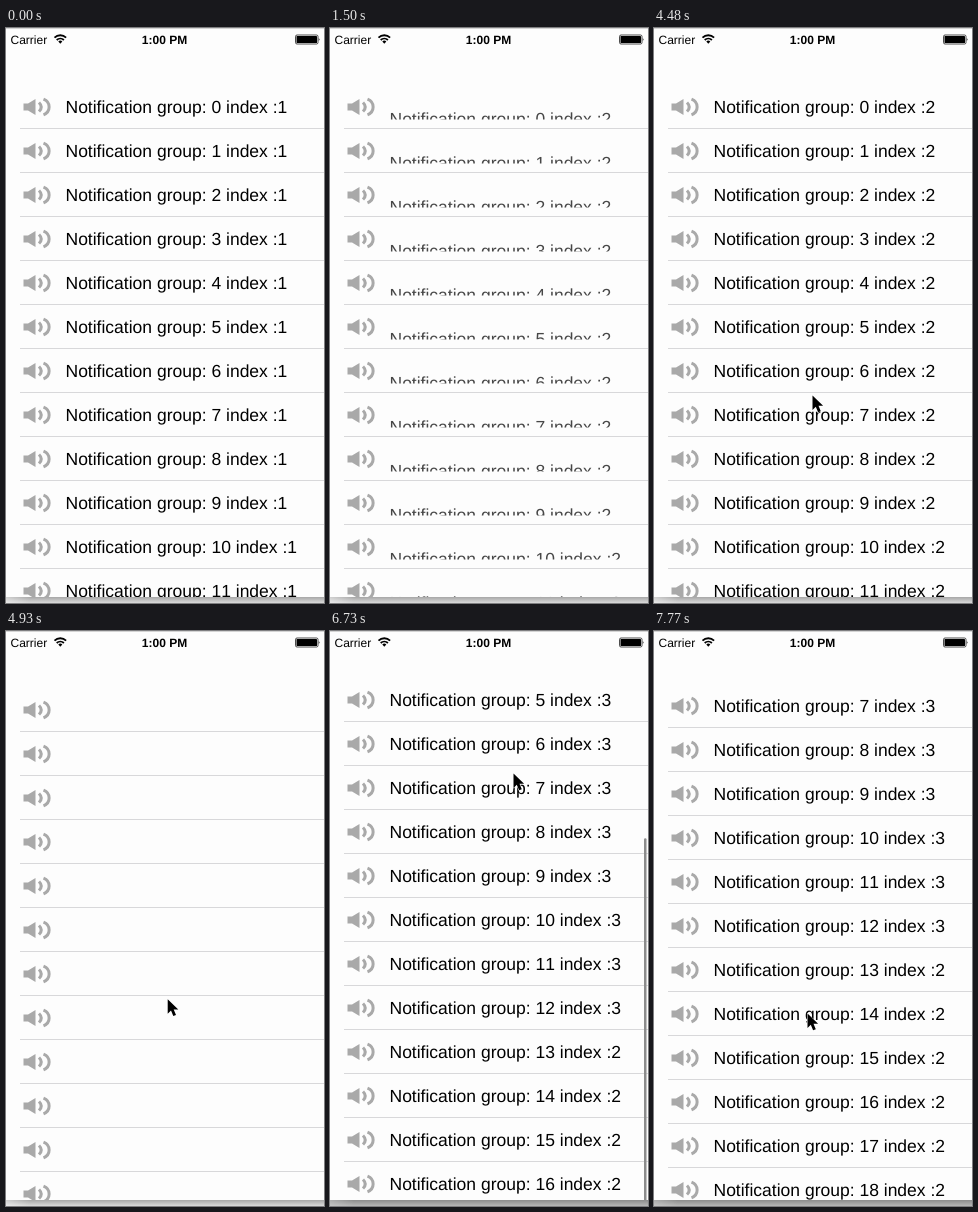
Write an HTML page that moves like this. It is 318x575 px and loops after 8 s.

```html
<!DOCTYPE html>
<html lang="en">
<head>
<meta charset="utf-8">
<title>Notification list</title>
<style>
  html, body { margin: 0; width: 100%; height: 100%; overflow: hidden; background: #fdfdfd; }
  #stage { display: block; width: 318px; height: 575px; }
  text {
    font-family: "Liberation Sans", Arial, sans-serif;
    font-kerning: none;
    text-rendering: geometricPrecision;
  }
  .label { font-size: 17.5px; }
</style>
</head>
<body>
<svg id="stage" viewBox="0 0 318 575">
  <defs>
    <clipPath id="list"><rect y="57" width="318" height="512"/></clipPath>
    <linearGradient id="shadow" x2="0" y2="1">
      <stop offset="0" stop-color="#000" stop-opacity=".34"/>
      <stop offset="1" stop-color="#000" stop-opacity=".14"/>
    </linearGradient>
    <linearGradient id="edge">
      <stop offset="0" stop-color="#fff" stop-opacity=".45"/>
      <stop offset="1" stop-color="#fff" stop-opacity="0"/>
    </linearGradient>
    <g id="speaker" fill="none" stroke="#a9a9a9" stroke-width="3">
      <path d="M17.5 75.5h4.5l7.5-4.5v16l-7.5-4.5h-4.5z" fill="#a9a9a9" stroke="none"/>
      <path d="M33 74.5q4.5 4.5 0 9"/>
      <path d="M37.5 71.2c7.5 3 7.5 12.600 0 15.600"/>
    </g>
  </defs>

  <rect width="318" height="575" fill="#fdfdfd"/>
  <rect width="318" height="1" fill="#d4d4d4"/>

  <text x="4.500" y="15.500" font-size="12">Carrier</text>
  <g fill="none" stroke="#000" stroke-width="1.800">
    <path d="M48.500 9.600a8.300 8.300 0 0 1 11.600 0"/>
    <path d="M50.700 12a5.200 5.200 0 0 1 7.200 0"/>
    <path d="M52.300 13.400a2.900 2.900 0 0 1 4 0l-2 2.300z" fill="#000" stroke="none"/>
  </g>
  <text x="158.500" y="15.500" font-size="12" font-weight="700" text-anchor="middle">1:00 PM</text>
  <rect x="289.500" y="7" width="22.500" height="9" rx="1.500" fill="#fdfdfd" stroke="#000" stroke-width=".7"/>
  <rect x="290.500" y="8" width="20.500" height="7" rx=".6"/>
  <path d="M312.800 10q1.500 1.500 0 3z"/>

  <g clip-path="url(#list)">
    <g id="rows"></g>
    <rect id="bar" x="314" width="2.500" height="379" rx="1.250" fill="#8c8c8c"/>
  </g>

  <g id="base">
    <rect y="569" width="318" height="6" fill="url(#shadow)"/>
    <rect y="569" width="24" height="6" fill="url(#edge)"/>
    <rect id="focus" y="569" width="318" height="6" fill="#000" opacity=".16"/>
  </g>

  <path id="cursor" d="M.5 .5v14.500l3.300-3.200 2.300 5.500 2.700-1.100-2.300-5.400h4.600z"
        stroke="#fff" stroke-width="1" paint-order="stroke"/>
</svg>

<script>
const LOOP = 8000;
const STEP = 149.4;
const ROW = 44;
const ROW_COUNT = 20;
const LAST_UPDATED = 12; // rows beyond this one keep index 2

// step, index, vertical shift, opacity
const labelStates = [
  [0, 1, 0, 1], [6, 1, -9, 0.6], [7, 1, 0, 0],
  [10, 2, 12, 0.72], [11, 2, 0, 1], [24, 2, -8, 0.7], [25, 2, 0, 0],
  [28, 2, 12, 0.72], [29, 2, 0, 1], [32, 2, -9, 0.6], [33, 2, 0, 0],
  [35, 3, 12, 0.72], [36, 3, 0, 1]
];

// step, x, y of the pointer tip
const pointerTrack = [
  [13, 250, 559], [14, 120, 428], [16, 120, 428], [17, 127, 423], [19, 127, 423],
  [20, 128, 420], [23, 128, 420], [30, 158, 367], [32, 160, 367], [37, 166, 371],
  [41, 168, 372], [42, 170, 362], [43, 175, 302], [44, 180, 222], [45, 183, 142],
  [46, 184, 165], [48, 181, 261], [50, 164, 345], [52, 153, 382]
];

// step, scroll offset
const scrollTrack = [
  [41, 0], [42, 10], [43, 70], [44, 150], [45, 230], [46, 295],
  [47, 328], [48, 320], [49, 315], [50, 313], [51, 312]
];

// step, scroll bar opacity
const barTrack = [[41, 0], [42, 0.6], [43, 1], [49, 1], [50, 0.5], [51, 0]];

const byId = id => document.getElementById(id);

function add(parent, tag, attrs) {
  const node = document.createElementNS("http://www.w3.org/2000/svg", tag);
  for (const name in attrs) node.setAttribute(name, attrs[name]);
  return parent.appendChild(node);
}

function sample(track, step) {
  const next = track.findIndex(key => key[0] > step);
  if (next === 0) return track[0].slice(1);
  if (next < 0) return track[track.length - 1].slice(1);
  const a = track[next - 1], b = track[next];
  const p = (step - a[0]) / (b[0] - a[0]);
  return a.slice(1).map((v, i) => v + (b[i + 1] - v) * p);
}

const labels = Array.from({ length: ROW_COUNT }, (_, n) => {
  const row = add(byId("rows"), "g", { transform: `translate(0 ${n * ROW})` });
  add(row, "use", { href: "#speaker" });
  add(row, "rect", { x: 14, y: 100, width: 304, height: 1, fill: "#d8d8da" });
  const box = add(row, "svg", { y: 66, width: 318, height: 25.5, overflow: "hidden" });
  return add(box, "text", { class: "label", x: 59.5 });
});

function draw(time) {
  const step = Math.floor((time % LOOP + 2) / STEP);

  const [, index, shift, opacity] = labelStates.filter(s => s[0] <= step).pop();
  labels.forEach((label, n) => {
    const fixed = n > LAST_UPDATED;
    label.textContent = `Notification group: ${n} index :${fixed ? 2 : index}`;
    label.setAttribute("y", 19 + (fixed ? 0 : shift));
    label.setAttribute("opacity", fixed ? 1 : opacity);
  });

  const [offset] = sample(scrollTrack, step);
  byId("rows").setAttribute("transform", `translate(0 ${-offset})`);
  byId("bar").setAttribute("y", 54 + offset * 2 / 3);
  byId("bar").setAttribute("opacity", sample(barTrack, step)[0]);
  byId("focus").style.visibility = step >= 42 ? "visible" : "hidden";

  const [x, y] = sample(pointerTrack, step);
  byId("cursor").setAttribute("transform", `translate(${x} ${y})`);
  byId("cursor").style.visibility = step >= 13 ? "visible" : "hidden";
}

const start = performance.now();
function tick() {
  draw(performance.now() - start);
  requestAnimationFrame(tick);
}
tick();
</script>
</body>
</html>
```
